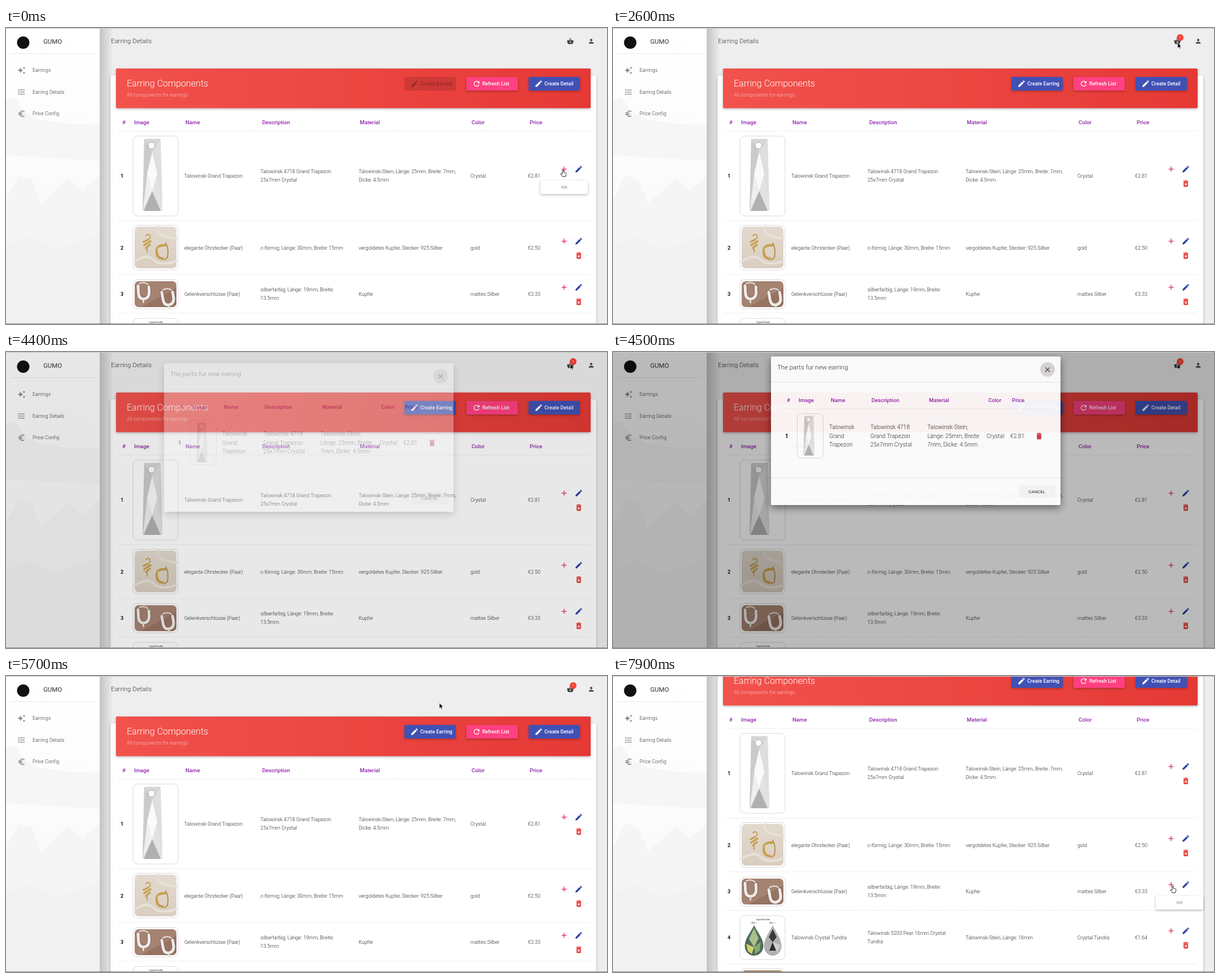
Write an HTML page that moves like this. It is 1065 px wide and 526 px high and loops after 8 s.

```html
<!DOCTYPE html>
<html lang="en">
<head>
<meta charset="utf-8">
<title>Earring Details</title>
<style>
  html, body { margin: 0; width: 100%; height: 100%; overflow: hidden; background: #eee; }
  svg { display: block; width: 100vw; height: 100vh; font-family: Roboto, Arial, sans-serif; }
</style>
</head>
<body>
<svg id="stage" viewBox="0 0 1065 526"></svg>
<script>
const LOOP = 8000;
const ICONS = {
  edit: 'M3 17.25V21h3.75L17.81 9.94l-3.75-3.75L3 17.25zM20.71 7.04c.39-.39.39-1.02 0-1.41l-2.34-2.34c-.39-.39-1.02-.39-1.41 0l-1.83 1.83 3.75 3.75 1.83-1.83z',
  add: 'M19 13h-6v6h-2v-6H5v-2h6V5h2v6h6v2z',
  trash: 'M6 19c0 1.1.9 2 2 2h8c1.1 0 2-.9 2-2V7H6v12zM19 4h-3.5l-1-1h-5l-1 1H5v2h14V4z',
  remove: 'M6 19c0 1.1.9 2 2 2h8c1.1 0 2-.9 2-2V7H6v12zm2.46-7.12l1.41-1.41L12 12.59l2.12-2.12 1.41 1.41L13.41 14l2.12 2.12-1.41 1.41L12 15.41l-2.12 2.12-1.41-1.41L10.59 14l-2.13-2.12zM15.5 4l-1-1h-5l-1 1H5v2h14V4z',
  refresh: 'M17.65 6.35C16.2 4.9 14.21 4 12 4c-4.42 0-7.99 3.58-7.99 8s3.57 8 7.99 8c3.73 0 6.84-2.55 7.73-6h-2.08c-.82 2.33-3.04 4-5.65 4-3.31 0-6-2.69-6-6s2.69-6 6-6c1.66 0 3.14.69 4.22 1.78L13 11h7V4l-2.35 2.35z',
  basket: 'M17.21 9l-4.38-6.56c-.19-.28-.51-.42-.83-.42-.32 0-.64.14-.83.43L6.79 9H2c-.55 0-1 .45-1 1 0 .09.01.18.04.27l2.54 9.27c.23.84 1 1.46 1.92 1.46h13c.92 0 1.69-.62 1.93-1.46l2.54-9.27L23 10c0-.55-.45-1-1-1h-4.79zM9 9l3-4.4L15 9H9zm3 8c-1.1 0-2-.9-2-2s.9-2 2-2 2 .9 2 2-.9 2-2 2z',
  person: 'M12 12c2.21 0 4-1.79 4-4s-1.79-4-4-4-4 1.79-4 4 1.79 4 4 4zm0 2c-2.67 0-8 1.34-8 4v2h16v-2c0-2.66-5.33-4-8-4z',
  list: 'M2.5 4.5h3v3h-3zM2.5 10.5h3v3h-3zM2.5 16.5h3v3h-3zM7 19h14v-2H7v2zm0-6h14v-2H7v2zm0-8v2h14V5H7z',
  euro: 'M15 18.5c-2.51 0-4.68-1.42-5.76-3.5H15v-2H8.58c-.05-.33-.08-.66-.08-1s.03-.67.08-1H15V9H9.24C10.32 6.92 12.5 5.5 15 5.5c1.61 0 3.09.59 4.23 1.57L21 5.3C19.41 3.87 17.3 3 15 3c-3.92 0-7.24 2.51-8.48 6H3v2h3.06c-.04.33-.06.66-.06 1s.02.67.06 1H3v2h3.52c1.24 3.49 4.56 6 8.48 6 2.31 0 4.41-.87 6-2.3l-1.78-1.77c-1.13.98-2.6 1.57-4.22 1.57z',
  stars: 'M19 9l1.25-2.75L23 5l-2.75-1.25L19 1l-1.25 2.75L15 5l2.75 1.25L19 9zm-7.5.5L9 4 6.5 9.5 1 12l5.5 2.5L9 20l2.5-5.5L17 12l-5.5-2.5zM19 15l-1.25 2.75L15 19l2.75 1.25L19 23l1.25-2.75L23 19l-2.75-1.25L19 15z',
  close: 'M19 6.41L17.59 5 12 10.59 6.41 5 5 6.41 10.59 12 5 17.59 6.41 19 12 13.41 17.59 19 19 17.59 13.41 12z'
};
const BLUE = '#3f51b5', PINK = '#ff4081', RED = '#e53935', PURPLE = '#8e24aa';

// y is the middle of the capitals / of the icon
const text = (x, y, s, size = 8.94, weight = 300, fill = '#222', anchor = 'start') =>
  `<text x="${x}" y="${y + size * .35}" font-size="${size}" font-weight="${weight}" fill="${fill}" text-anchor="${anchor}">${s}</text>`;
const lines = (x, y, rows, size, gap = 15.4) =>
  rows.map((s, i) => text(x, y + (i - (rows.length - 1) / 2) * gap, s, size)).join('');
const icon = (name, x, y, fill, size = 15.3) =>
  `<path d="${ICONS[name]}" fill="${fill}" transform="translate(${x - size / 2} ${y - size / 2}) scale(${size / 24})"/>`;
const rect = (x, y, w, h, fill, r = 0, extra = '') =>
  `<rect x="${x}" y="${y}" width="${w}" height="${h}" rx="${r}" fill="${fill}" ${extra}/>`;
const poly = (points, fill) => `<polygon points="${points}" fill="${fill}"/>`;
const stroke = (d, color, w) => `<path d="${d}" fill="none" stroke="${color}" stroke-width="${w}" stroke-linecap="round"/>`;
const rule = (x1, x2, y, dash = '') =>
  `<path d="M${x1} ${y}H${x2}" stroke="#e2e2e2" stroke-width=".8" stroke-dasharray="${dash}"/>`;
const thumb = (x, y, w, h) => rect(x, y, w, h, '#fff', 8, 'stroke="#d9d9d9"');
const heads = (y, cols) => cols.map(([x, s]) => text(x, y, s, 9.65, 500, PURPLE)).join('');

function button(x, name, label, fill, ink, flat) {
  return rect(x, 87, 91, 24, fill, 2, flat ? '' : 'filter="url(#low)"') +
    icon(name, x + 18, 99, ink) + text(x + 28, 99.3, label, 8.94, 500, ink);
}

function crystal(x, y, scale) {
  return `<g transform="translate(${x} ${y}) scale(${scale})">` +
    poly('4,0 33,0 36,128 1,128', '#e2e2e2') +
    poly('4,0 18,24 10,60 1,128', '#cbcbcb') +
    poly('4,0 33,0 18,24', '#d6d6d6') +
    poly('33,0 18,24 26,60 36,118', '#dedede') +
    poly('18,24 27,62 18,93 9,62', '#fafafa') +
    poly('18,93 33,128 3,128', '#b0b0b0') + poly('18,93 9,64 3,122', '#efefef') +
    '<circle cx="17" cy="12" r="6" fill="#fff" stroke="#a5a5a5"/></g>';
}

function goldPair() {
  const gold = '#c6a054';
  return rect(228, 353, 74, 74, 'url(#cream)', 7) +
    stroke('M228 415Q250 400 262 412T302 414M270 353Q262 370 302 374', '#e8e1d8', 4) +
    stroke('M248 369A4 4 0 1 1 254 374', gold, 2) +
    stroke('M252 376L244 380M256 379L245 386M255 385L248 391', gold, 3.5) + stroke('M250 392V398', gold, 2) +
    stroke('M282 386Q267 385 267 397T278 410', gold, 4.5) +
    stroke('M283 382Q289 392 286 408L281 412', '#b98f45', 2) + stroke('M270 390Q268 398 273 405', '#e6cf96', 1.5);
}

function silverPair() {
  const hoop = 'M1 0V13Q1 24 10 24T20 13V3';
  const one = (x, y, a) => `<g transform="translate(${x} ${y}) rotate(${a})">` +
    stroke('M1 0Q3-6 11-5T20 3', '#eae4df', 2) + stroke(hoop, '#846658', 7) + stroke(hoop, '#eeebe8', 5) +
    stroke('M9 25V30', '#e4dfda', 3) + '</g>';
  return rect(228, 450, 74, 46, '#a58371', 7) + poly('240,496 302,462 302,490 296,496', '#967363') +
    one(233, 458, -3) + one(275, 470, -10);
}

function pearPair() {
  const pear = (x, w, fill) => `<path d="M${x} 533C${x + 6} 546 ${x + w} 556 ${x + w} 570A${w} 17 0 0 1 ${x - w} 570C${x - w} 556 ${x - 6} 546 ${x} 533Z" fill="${fill}"/>`;
  return text(266, 522.5, 'Crystal Tundra', 3.7, 500, '#333', 'middle') +
    text(250, 528.5, '0002. 1', 3, 500, '#555', 'middle') + text(282, 528.5, '0003. 1', 3, 500, '#555', 'middle') +
    pear(250, 16.5, '#4d6a5c') + poly('250,538 258,556 250,572 241,557', '#a9bf8c') +
    poly('236,566 250,572 246,584 239,579', '#cfd268') + poly('250,572 262,562 260,578 252,584', '#86a873') +
    pear(283, 15.5, '#b1afb2') + poly('283,540 290,554 283,563 276,554', '#3a383b') +
    poly('283,563 289,578 277,578', '#2f2d30') + poly('283,563 297,568 291,582', '#cfcdd0');
}

const rows = [
  [262.5, ['Talowinsk Grand Trapezon'], ['Talowinsk 4718 Grand Trapezon', '25x7mm Crystal'],
    ['Talowinsk-Stein; Länge: 25mm, Breite: 7mm,', 'Dicke: 4.5mm'], 'Crystal', '€2.81'],
  [390.5, ['elegante Ohrstecker (Paar)'], ['c-förmig; Länge: 30mm, Breite: 15mm'],
    ['vergoldetes Kupfer, Stecker: 925 Silber'], 'gold', '€2.50'],
  [472.5, ['Gelenkverschlüsse (Paar)'], ['silberfarbig; Länge: 19mm, Breite:', '13.5mm'],
    ['Kupfer'], 'mattes Silber', '€3.33'],
  [554.5, ['Talowinsk Crystal Tundra'], ['Talowinsk 5203 Pear 16mm Crystal', 'Tundra'],
    ['Talowinsk-Stein, Länge: 16mm'], 'Crystal Tundra', '€1.64']
];

function tableRow([y, name, description, material, color, price], i) {
  return text(205.5, y, i + 1, 8.94, 700, '#111', 'middle') + lines(316, y, name) +
    lines(451, y, description) + lines(625, y, material) + lines(823, y, [color]) + lines(925, y, [price]) +
    icon('add', 989, y - 11.7, '#e0245e') + icon('edit', 1015, y - 11.7, '#303fa8') + icon('remove', 1015, y + 14, RED);
}

function mainPage() {
  return rect(185, 84, 861, 700, '#fff', 4, 'filter="url(#low)"') +
    text(186, 23.5, 'Earring Details', 11.4, 300, '#333') +
    icon('basket', 1000, 23.5, '#444', 13) + icon('person', 1037, 23.5, '#444', 12.8) +
    `<g id="badge"><circle cx="1005" cy="17" r="6" fill="#f44336"/>
     <text id="count" x="1005" y="19.2" font-size="6" fill="#fff" text-anchor="middle"></text></g>` +
    rect(195, 72, 841, 70.5, 'url(#red)', 2, 'filter="url(#low)"') +
    text(214, 98, 'Earring Components', 16, 300, '#fff') +
    text(214, 119.3, 'All components for earrings', 8.94, 300, '#f9c8c6') +
    `<g id="off">${button(706, 'edit', 'Create Earring', 'rgba(0,0,0,.12)', 'rgba(0,0,0,.28)', true)}</g>` +
    `<g id="on">${button(706, 'edit', 'Create Earring', BLUE, '#fff')}</g>` +
    button(816, 'refresh', 'Refresh List', PINK, '#fff') + button(926, 'edit', 'Create Detail', BLUE, '#fff') +
    heads(167.5, [[206, '#'], [227, 'Image'], [318, 'Name'], [454, 'Description'], [627, 'Material'], [825, 'Color'], [928, 'Price']]) +
    [183, 342.5, 438, 506.5, 602].map(y => rule(198, 1034, y, '2 1')).join('') +
    thumb(225, 192, 80, 142) + thumb(225, 350.5, 80, 79.5) + thumb(225, 447, 80, 52) + thumb(225, 516, 80, 78) + thumb(225, 610, 80, 60) +
    crystal(241, 197, 1) + goldPair() + silverPair() + pearPair() + rect(228, 613, 74, 54, '#a98a6c', 7) +
    rows.map(tableRow).join('');
}

function sidebar() {
  const item = (y, name, label) => icon(name, 27.5, y, '#888', 15) + text(47, y, label, 8.94, 300, '#333');
  return rect(166, 0, 24, 526, 'url(#edge)') + rect(0, 0, 166, 526, 'url(#side)') +
    poly('0,128 14,122 34,150 60,163 110,170 166,172 166,236 0,226', '#f6f6f6') +
    poly('0,305 22,262 46,270 62,312 110,268 136,290 166,262 166,526 0,526', '#f5f5f5') +
    poly('0,385 40,372 90,392 166,366 166,526 0,526', '#f2f2f2') +
    '<circle cx="30.5" cy="26" r="11" fill="#111"/>' +
    text(66, 23.5, 'GUMO', 11.5, 400, '#333') + rule(9, 157, 45.5) +
    item(75.3, 'stars', 'Earrings') + item(113.8, 'list', 'Earring Details') + item(152.3, 'euro', 'Price Config');
}

function dialog() {
  return rect(280, 8, 513, 264, '#fff', 2, 'filter="url(#high)"') +
    text(291, 27, 'The parts fur new earring', 11.4, 300, '#222') +
    '<circle cx="770" cy="31" r="13" fill="#dad5d6"/>' + icon('close', 770, 31.3, '#333', 15) +
    rule(280, 793, 53.5) + rule(280, 793, 223.5) + rule(299, 775, 101, '2 1') +
    heads(85.5, [[308, '#'], [329, 'Image'], [386, 'Name'], [458, 'Description'], [560, 'Material'], [665, 'Color'], [707, 'Price']]) +
    text(308, 149, '1', 10.2, 700, '#111', 'middle') + thumb(326.5, 109.5, 46, 79) + crystal(337, 113.5, .55) +
    lines(383, 149, ['Talowinsk', 'Grand', 'Trapezon'], 10.2) +
    lines(456, 149, ['Talowinsk 4718', 'Grand Trapezon', '25x7mm Crystal'], 10.2) +
    lines(557, 149, ['Talowinsk-Stein;', 'Länge: 25mm, Breite:', '7mm, Dicke: 4.5mm'], 10.2) +
    lines(662, 149, ['Crystal'], 10.2) + lines(704, 149, ['€2.81'], 10.2) + icon('trash', 755, 149.5, '#d32f46') +
    rect(719, 236, 65, 22, '#f6f6f6', 2) + text(751, 248, 'CANCEL', 7.9, 400, '#222', 'middle');
}

const gradient = (id, a, b, dir = 'x2="0" y2="1"') =>
  `<linearGradient id="${id}" ${dir}><stop stop-color="${a}"/><stop offset="1" stop-color="${b}"/></linearGradient>`;
const shadow = (id, dy, blur, alpha) =>
  `<filter id="${id}" x="-20%" y="-40%" width="140%" height="200%"><feDropShadow dx="0" dy="${dy}" stdDeviation="${blur}" flood-opacity="${alpha}"/></filter>`;
const $ = id => document.getElementById(id);

$('stage').innerHTML = '<defs>' +
  gradient('red', '#f2524d', RED, 'x2="1" y2="0"') + gradient('side', '#fff', '#f7f7f7') +
  gradient('cream', '#e2dace', '#d9cdc0') +
  gradient('edge', 'rgba(0,0,0,.18)', 'rgba(0,0,0,0)', 'x2="1" y2="0"') +
  shadow('low', 1.5, 2, .28) + shadow('high', 5, 7, .5) + '</defs>' +
  rect(0, 0, 1065, 526, '#eee') +
  `<g id="page">${mainPage()}</g>` + sidebar() +
  `<g id="tip">${rect(-42, 0, 84, 24, '#fff', 2, 'filter="url(#low)"')}
   <text id="tipText" y="14.2" font-size="6.4" font-weight="300" fill="#555" text-anchor="middle"></text></g>` +
  rect(0, 0, 1065, 526, '#000', 0, 'id="shade"') + `<g id="dialog">${dialog()}</g>` +
  rect(0, 0, 1065, 1.2, '#c8c8c8') + rect(0, 525, 1065, 1, '#8a8a8a') +
  `<g id="cursor" stroke-linejoin="round">
    <path id="arrow" d="M0 0V9.5L2.2 7.6 3.8 11 5.3 10.3 3.8 7H6.7Z" fill="#000" stroke="#fff" stroke-width=".6"/>
    <path id="hand" d="M-1.1 .8Q0-.8 1.1 .8V4.2L4.6 5Q6 5.4 5.7 7.6L4.6 12H-1L-4 7.6Q-4 6-2.6 6.4L-1.1 7.6Z" fill="#fff" stroke="#111" stroke-width=".9"/>
   </g>`;

// time, x, y of the pointer tip: add, badge, create button, basket, close, second add, third add
const path = [
  [0, 987, 252], [300, 987, 252], [1200, 990, 250], [1500, 992, 248], [1900, 990, 250],
  [2700, 1001, 16], [3300, 698, 97], [3450, 700, 96], [4300, 1000, 21], [4600, 1000, 21],
  [5200, 770, 31], [5450, 769, 32], [5700, 768, 48], [6150, 987, 376], [6900, 988, 378],
  [7500, 831, 361], [7800, 1012, 370], [7900, 992, 373], [8000, 992, 373]
];
const handTimes = [[0, 1950], [2650, 2800], [3150, 3250], [4200, 4350], [5050, 5450], [6050, 7000], [7750, 8000]];
const tips = [[-200, 2050, 989, 271, 'Add'], [6150, 7050, 989, 398.5, 'Add'], [7700, 8200, 1004, 391, 'Edit']];

const ramp = (t, a, b) => Math.min(1, Math.max(0, (t - a) / (b - a)));
const smooth = u => u * u * (3 - 2 * u);
const show = (id, visible) => $(id).setAttribute('visibility', visible ? 'visible' : 'hidden');
const move = (id, x, y) => $(id).setAttribute('transform', `translate(${x} ${y})`);

function draw(t) {
  const i = path.findIndex(p => p[0] > t), [t0, x0, y0] = path[i - 1], [t1, x1, y1] = path[i];
  const u = smooth(ramp(t, t0, t1));
  move('cursor', x0 + (x1 - x0) * u, y0 + (y1 - y0) * u);
  const hand = handTimes.some(([a, b]) => t >= a && t < b);
  show('hand', hand);
  show('arrow', !hand);

  const added = t >= 1800;
  show('badge', added);
  show('on', added);
  show('off', !added);
  $('count').textContent = t < 6900 ? 1 : 2;
  move('page', 0, -90 * smooth(ramp(t, 7500, 7780)));

  const tip = tips.find(([a, b]) => t >= a && t < b);
  show('tip', tip);
  if (tip) {
    const [a, b, x, y, label] = tip;
    move('tip', x, y);
    $('tipText').textContent = label;
    $('tip').setAttribute('opacity', Math.min(ramp(t, a, a + 150), 1 - ramp(t, b - 100, b)));
  }

  const closing = 1 - ramp(t, 5450, 5600);
  $('shade').setAttribute('opacity', .27 * ramp(t, 4350, 4500) * closing);
  $('dialog').setAttribute('opacity', ramp(t, 4350, 4510) * closing);
  move('dialog', 0, 12 * (1 - ramp(t, 4400, 4500)));
}

function tick(now) {
  draw(Math.floor(now % LOOP / 100) * 100);
  requestAnimationFrame(tick);
}
requestAnimationFrame(tick);
</script>
</body>
</html>
```
